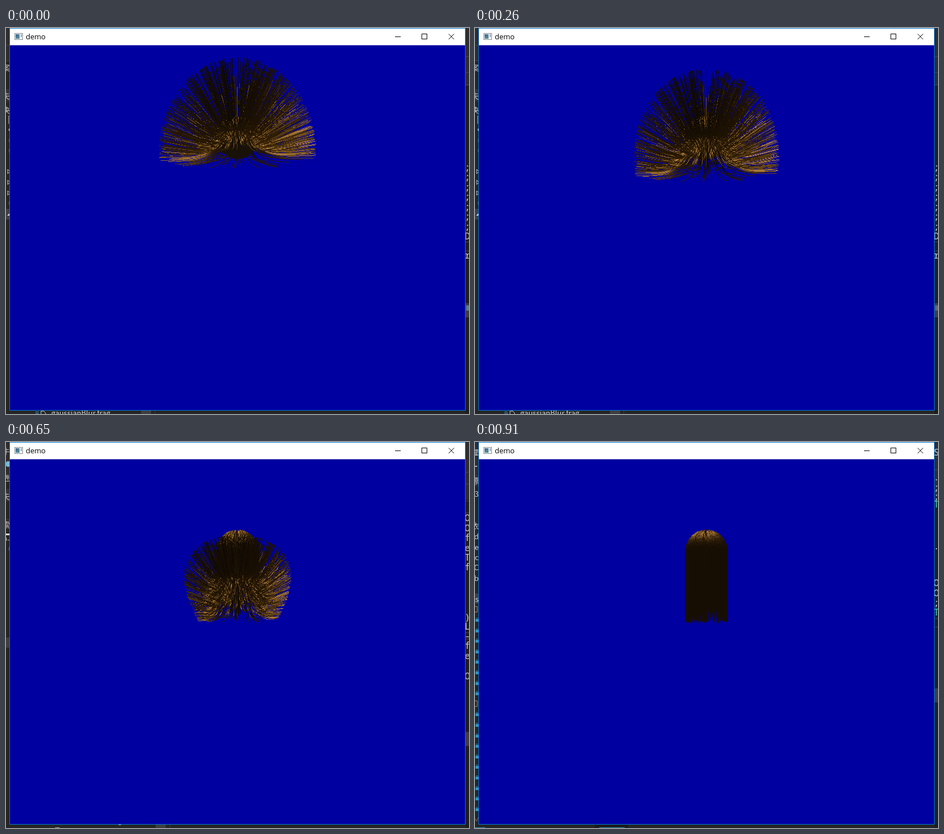
These frames come from a looping animation (820 px wide and 683 px high, 1.04 s). An HTML page with a canvas:

```html
<!DOCTYPE html>
<html lang="en">
<head>
<meta charset="utf-8">
<title>demo</title>
<style>
  html, body { margin: 0; width: 820px; height: 683px; overflow: hidden; background: #252526; }
  svg, canvas { position: absolute; left: 0; top: 0; display: block; }
  canvas { left: 230px; top: 31px; }
  #desk g { display: none; }
  #desk g.on { display: inline; }
  .ui { font: 13px "Noto Sans CJK SC", "Noto Sans", sans-serif; }
  .code { font: 17px "Noto Sans Mono", monospace; }
  .title { font: 13px "Open Sans", "Noto Sans", sans-serif; }
</style>
</head>
<body>
<svg width="820" height="683" viewBox="0 0 820 683">
  <rect width="820" height="683" fill="#252526"/>
  <path d="M814 102h6v581h-6z" fill="#1e1e1e"/>
  <path d="M0 0h7v57H0zM814 0h6v102h-6z" fill="#2d2d30"/>
  <g id="desk"></g>
  <rect x="6.5" y=".5" width="807" height="676" fill="#0000a0" stroke="#0078d7"/>
  <path d="M7 1h806v29.500H7z" fill="#fff"/>
  <g shape-rendering="crispEdges">
    <rect x="15.5" y="9.5" width="14" height="11" fill="#f4f6f6" stroke="#858c90"/>
    <path d="M17 11h7v8h-7z" fill="#4f8795"/>
    <path d="M17 11h4v4h-4z" fill="#49699b"/>
    <path d="M26 11h2v5h-2z" fill="#9aa5a8"/>
    <path d="M689 15.5h10M736.5 10.5h9v9h-9z" fill="none" stroke="#000"/>
  </g>
  <path d="M784 10.500l9.500 9.500M793.500 10.500l-9.500 9.500" stroke="#000"/>
  <text class="title" x="35" y="20">demo</text>
</svg>
<canvas id="hair" width="360" height="340"></canvas>
<script>
const STEP = 130, STEPS = 8;

// ---- editor peeking out behind the window ----
const rect = (x, y, w, h, fill) => `<rect x="${x}" y="${y}" width="${w}" height="${h}" fill="${fill}"/>`;
const text = (s, x, y, cls, fill, end) =>
  `<text class="${cls}" x="${x}" y="${y}" fill="${fill}"${end ? ' text-anchor="end"' : ''}>${s}</text>`;
const left = rows => rows.map(([y, s]) => text(s, 6.5, y + 5, 'ui', '#d0d0d0', true)).join('');
const right = (rows, fill = '#c8c8c8') => rows.map(([y, s]) => text(s, 812, y + 6, 'code', fill)).join('');
const lines = (x, ys) => ys.map(y => rect(x, y, 7, 1, '#46464a')).join('');
const marks = (ys, fill) => ys.map(y => rect(1, y, 5, 5, fill)).join('');
const caption = (s, x, y) =>
  rect(x - 28, y - 3, 6, 1, '#3aa6d8') + rect(x - 28, y, 6, 1, '#3aa6d8') +
  `<path d="M${x - 18} ${y + 4}v-8h5l3 3v5" fill="none" stroke="#ccc"/>` +
  text(s, x, y + 4, 'ui', '#d0d0d0');

const blurView = mark =>
  rect(0, 108, 7, 22, '#333337') + rect(0, 320, 7, 19, '#3f3f46') + lines(0, [30, 57]) +
  left([[70, '案'], [120, '夫'], [145, '决'], [161, '|']]) +
  '<path d="M2 332l5-5v5z" fill="#ddd"/>' +
  [254, 273, 292].map(y => `<path d="M3 ${y - 4}l4 4l-4 4z" fill="none" stroke="#ccc"/>`).join('') +
  rect(5, 178, 2, 4, '#ddd') + [198, 216, 309].map(y => rect(5, y - 2, 2, 6, '#55555a')).join('') +
  lines(814, [50, 78, 100, 378, 394]) +
  right([246, 263, 281, 298, 316, 333, 351].map(y => [y, ';'])) +
  right([[368, 'D'], [402, 'r']]) +
  rect(814, 487, 6, 25, '#3e3e42') + rect(815, 491, 5, 9, mark) +
  rect(239, 677, 18, 6, '#3e3e42') + rect(263, 677, 1, 6, '#3e3e42') + caption('gaussianBlur.frag', 80, 682);

const grayView =
  rect(0, 86, 7, 18, '#333337') + lines(0, [26, 80]) +
  left([[13, '03'], [44, '彩'], [68, '白'], [94, '案'], [118, '案'], [137, '<tspan font-weight="700">Sc</tspan>'],
    [155, '引'], [174, '外'], [193, 'ir'], [286, 'sr']]) +
  [210, 229, 247, 266].map(y => `<path d="M0 ${y - 5}h6v10h-6" fill="none" stroke="#aaa"/>`).join('') +
  rect(0, 299, 6, 3, '#c99245') + rect(0, 305, 6, 3, '#c99245') +
  rect(0, 319, 2, 6, '#ddd') + rect(0, 486, 2, 6, '#ddd') +
  lines(814, [52, 75, 299, 315]) + right([[44, 'H'], [342, 'I']]) +
  rect(814, 462, 6, 25, '#3e3e42') + rect(814, 465, 6, 9, '#7b6d59') +
  text('型', 813, 523, 'ui', '#888') +
  rect(213, 677, 18, 6, '#3e3e42') + rect(237, 677, 1, 6, '#3e3e42') + caption('grayscale.frag', 54, 675);

const foldView =
  rect(0, 83, 7, 22, '#333337') + rect(0, 136, 7, 18, '#333337') + rect(0, 346, 7, 18, '#3e3e42') +
  left([[16, '牛'], [63, '进'], [96, '夫'], [146, '索'], [172, 'D-']]) +
  '<circle cx="4" cy="39" r="5" fill="#73bdd0"/>' +
  rect(0, 162, 6, 3, '#ddd') + rect(5, 186, 2, 6, '#2e7f91') +
  lines(814, [53, 74, 104, 125, 337, 348]) +
  right([[134, 'O'], [152, 'O'], [169, 'f'], [187, 'e'], [204, 'T'], [221, 'f'], [310, ')'],
    [326, 'L'], [343, '-'], [360, 'f'], [378, 'e'], [414, 'O']]) +
  rect(814, 513, 6, 25, '#3e3e42') +
  rect(265, 677, 18, 6, '#3e3e42') + rect(290, 677, 1, 6, '#3e3e42') +
  text('g', 198, 675, 'ui', '#d0d0d0') + rect(87, 682, 8, 1, '#aaa');

const lockRows = Array.from({ length: 19 }, (_, i) => 313 + Math.round(i * 18.6)).filter((_, i) => i !== 8);
const lockView =
  rect(0, 58, 7, 20, '#333337') + rect(0, 268, 7, 18, '#3e3e42') +
  left([[18, '理'], [68, '源'], [92, 't3'], [148, '依'], [167, 'd'], [186, 'e'], [204, 'c'], [222, 'C'],
    [241, 'tb'], [278, 'ss']]) +
  rect(0, 42, 4, 2, '#aaa') +
  [296, 463].map(y => `<path d="M0 ${y - 5}h4v10h-4" fill="none" stroke="#c98a50"/>`).join('') +
  marks(lockRows, '#2f95bf') + lockRows.map(y => rect(2, y - 2, 3, 1, '#2f95bf')).join('') +
  text('✓', 0, 671, 'ui', '#c0583f') +
  lines(814, [27, 49, 312, 327]) +
  right([[18, 'S'], [62, '.'], [80, ';'], [96, ';'], [184, '.'], [249, 'O'], [267, 'O'], [284, ';']]) +
  right([[110, 'T'], [301, 'T']], '#4ec9b0') +
  rect(814, 436, 6, 25, '#3e3e42') +
  rect(0, 682, 18, 1, '#2f95bf') + rect(212, 677, 59, 6, '#1b1b1c') + rect(220, 682, 45, 1, '#2f95bf');

const desk = document.getElementById('desk');
desk.innerHTML = [blurView('#587f8c'), blurView('#68686c'), grayView, foldView, lockView]
  .map(v => `<g>${v}</g>`).join('');
const viewAt = [0, 1, 1, 2, 2, 3, 3, 4];

// ---- hair: strands on a ball, falling from a fan to a hanging curtain ----
const W = 360, H = 340, OX = 230, OY = 31;
const CX = 410, CY = 194, EYE_Y = 353, EYE = 828;
const R = 37, LEN = 125, COUNT = 1050, SEGS = 16;

// tip reach at the rim, extra reach upward, drop, height of the fan, share hanging straight
const poses = [
  [137, 6, 39, 173, 0],
  [125, 22, 66, 181, 0],
  [125, 21, 67, 182, 0],
  [110, 34, 89, 179, 0],
  [92, 54, 107, 166, 0],
  [70, 78, 122, 148, 0],
  [60, 70, 124, 136, .6],
  [37, 0, 125, 125, 1]
];

function seeded(seed) {
  return () => {
    seed = seed + 0x6D2B79F5 | 0;
    let t = Math.imul(seed ^ seed >>> 15, 1 | seed);
    t = t + Math.imul(t ^ t >>> 7, 61 | t) ^ t;
    return ((t ^ t >>> 14) >>> 0) / 4294967296;
  };
}

// Even cover of the upper half, leaving the crown bare.
const rand = seeded(11);
const strands = Array.from({ length: COUNT }, (_, i) => ({
  lat: Math.asin(i / COUNT * .985),
  lon: rand() * Math.PI * 2,
  gloss: .2 + .8 * rand()
}));

const bez = (a, b, c, d, t) => {
  const u = 1 - t;
  return u * u * u * a + 3 * u * u * t * b + 3 * u * t * t * c + t * t * t * d;
};

// Point along a strand as [distance from the axis, height], y down.
function strandPoint(lat, t, [reach, extra, drop, rise, hang]) {
  const c = Math.cos(lat), s = Math.sin(lat);
  const a = reach + extra * s, q = a * .52;
  const tipR = a * c, tipY = drop - rise * s;
  let r = bez(R * c, (R + 6) * c, tipR - q * c, tipR, t);
  let y = bez(-R * s, -(R + 6) * s + drop * .9, tipY + q * s, tipY, t);
  if (hang) {
    const along = t * LEN, arc = R * lat;
    const ang = Math.max(0, lat - along / R);
    r += (R * Math.cos(ang) - r) * hang;
    y += (Math.max(0, along - arc) - R * Math.sin(ang) - y) * hang;
  }
  const d = Math.hypot(r, y), min = R * 1.01;
  if (d < min && d > 0) { r *= min / d; y *= min / d; }
  return [r, y];
}

const unit = v => v.map(n => n / Math.hypot(...v));
const dot = (a, b) => a[0] * b[0] + a[1] * b[1] + a[2] * b[2];
const lamp = unit([-.2, -.85, .5]);     // soft light, above and in front
const shine = unit([-.17, -.68, .7]);   // half way from the key light to the viewer
const pack = (r, g, b) => (255 << 24 | b << 16 | g << 8 | r) >>> 0;

// Strands glow where they run across the light.
function shade(dir, gloss) {
  const t = unit(dir);
  const spec = Math.max(0, 1 - dot(t, shine) ** 2) ** 10 * gloss;
  const diff = Math.max(0, 1 - dot(t, lamp) ** 2);
  return pack(14 + 34 * diff + 168 * spec, 9 + 20 * diff + 126 * spec, 3 + 72 * spec);
}

function project([x, y, z]) {
  const k = EYE / (EYE - z);
  return [CX + x * k - OX, EYE_Y + (y + CY - EYE_Y) * k - OY, z];
}

function render(pose) {
  const img = new ImageData(W, H);
  const px = new Uint32Array(img.data.buffer);
  const depth = new Float32Array(W * H).fill(-1e9);
  const plot = (x, y, z, color) => {
    if (x < 0 || y < 0 || x >= W || y >= H) return;
    const i = y * W + x;
    if (z > depth[i]) { depth[i] = z; px[i] = color; }
  };
  const line = (a, b, color) => {
    const n = Math.ceil(Math.max(Math.abs(b[0] - a[0]), Math.abs(b[1] - a[1]))) || 1;
    for (let i = 0; i <= n; i++) {
      const t = i / n;
      plot(Math.floor(a[0] + (b[0] - a[0]) * t), Math.floor(a[1] + (b[1] - a[1]) * t),
        a[2] + (b[2] - a[2]) * t, color);
    }
  };

  const ball = pack(24, 17, 7);
  for (let y = -R; y <= R; y++) {
    for (let x = -R; x <= R; x++) {
      const zz = R * R - x * x - y * y;
      if (zz >= 0) plot(CX - OX + x, CY - OY + y, Math.sqrt(zz) - 1, ball);
    }
  }

  for (const { lat, lon, gloss } of strands) {
    const cl = Math.cos(lon), sl = Math.sin(lon);
    let prev, prevPx;
    for (let i = 0; i <= SEGS; i++) {
      const [r, y] = strandPoint(lat, i / SEGS, pose);
      const p = [r * cl, y, r * sl], at = project(p);
      if (prev) line(prevPx, at, shade(p.map((n, k) => n - prev[k]), gloss));
      prev = p;
      prevPx = at;
    }
  }
  return img;
}

const ctx = document.getElementById('hair').getContext('2d');
const images = poses.map(render);
let shown = -1;

function tick() {
  const step = Math.floor(performance.now() / STEP) % STEPS;
  if (step !== shown) {
    shown = step;
    ctx.putImageData(images[step], 0, 0);
    [...desk.children].forEach((g, i) => g.classList.toggle('on', i === viewAt[step]));
  }
  requestAnimationFrame(tick);
}
tick();
</script>
</body>
</html>
```
